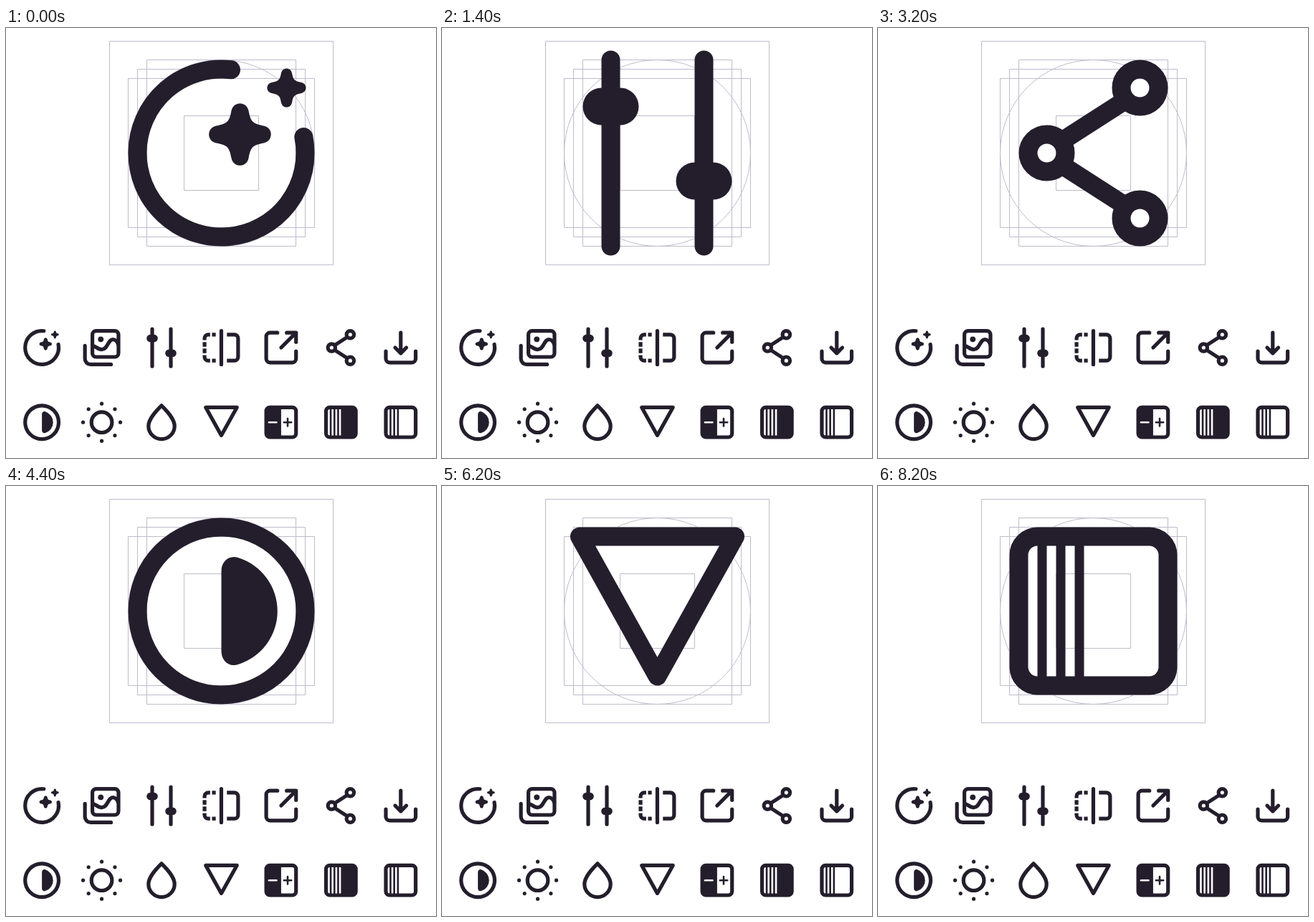
Recreate the animation shown at these times as an HTML page. Size 600x600 px, loop 8.8 s.

```html
<!DOCTYPE html>
<html lang="en">
<head>
<meta charset="utf-8">
<title>Icon set</title>
<style>
  html, body { margin: 0; width: 100%; height: 100%; overflow: hidden; background: #fff; }
  svg { display: block; width: 100vw; height: 100vh; }
  .guides { fill: none; stroke: #bfbbcd; }
  .guides * { vector-effect: non-scaling-stroke; stroke-width: 1px; }
  .icon { fill: none; stroke: #241e2c; stroke-width: 2; stroke-linecap: round; stroke-linejoin: round; }
  .solid { fill: #241e2c; stroke: none; }
  .butt { stroke-linecap: butt; }
  .thin { stroke-width: 1; }
</style>
</head>
<body>
<svg viewBox="0 0 600 600">
  <defs>
    <path id="star" class="solid" d="M-.92-2.55C-.7-3.59 .7-3.59 .92-2.55C1.15-1.35 1.35-1.15 2.55-.92C3.59-.7 3.59 .7 2.55 .92C1.35 1.15 1.15 1.35 .92 2.55C.7 3.59-.7 3.59-.92 2.55C-1.15 1.35-1.35 1.15-2.55 .92C-3.59 .7-3.59-.7-2.55-.92C-1.35-1.15-1.15-1.35-.92-2.55Z"/>
    <rect id="frame" x="4" y="4" width="16" height="16" rx="2"/>

    <g id="magic">
      <path d="M20.83 10.27A9 9 0 1 1 13.04 3.06"/>
      <use href="#star" transform="translate(14 10)"/>
      <use href="#star" transform="translate(19 5) scale(.625)"/>
    </g>
    <g id="gallery">
      <rect x="7" y="3" width="14" height="14" rx="2"/>
      <circle class="solid" cx="11.5" cy="7.5" r="1.5"/>
      <path class="butt" d="M7 11C8.7 11 9.8 13 12 13C15.3 13 15.3 7.6 18 7.6C19.3 7.6 20.5 9 21 10.6"/>
      <path d="M3 11V18A3 3 0 0 0 6 21H17"/>
    </g>
    <g id="sliders">
      <path d="M7 2V22M17 2V22"/>
      <rect class="solid" x="4" y="5" width="6" height="4" rx="2"/>
      <rect class="solid" x="14" y="13" width="6" height="4" rx="2"/>
    </g>
    <g id="mirror">
      <path d="M12 3V21"/>
      <path class="butt" d="M15 5H19A2 2 0 0 1 21 7V17A2 2 0 0 1 19 19H15M6 5H5A2 2 0 0 0 3 7V8M3 9V11.5M3 12.5V15M3 16V17A2 2 0 0 0 5 19H6M7 5H9M7 19H9"/>
    </g>
    <g id="export">
      <path d="M10 4H6A2 2 0 0 0 4 6V18A2 2 0 0 0 6 20H18A2 2 0 0 0 20 18V14M15 4H20V9M20 4L12 12"/>
    </g>
    <g id="share">
      <circle cx="17" cy="5" r="2"/>
      <circle cx="7" cy="12" r="2"/>
      <circle cx="17" cy="19" r="2"/>
      <path class="butt" d="M8.5 10.8L15.5 6.3M8.5 13.2L15.5 17.7"/>
    </g>
    <g id="download">
      <path d="M4 14V18A2 2 0 0 0 6 20H18A2 2 0 0 0 20 18V14M12 4V15M9 12L12 15L15 12"/>
    </g>
    <g id="contrast">
      <circle cx="12" cy="12" r="9"/>
      <path class="solid" d="M12 7.7C12 6.7 12.8 5.95 13.8 6.27A6 6 0 0 1 13.8 17.73C12.8 18.05 12 17.3 12 16.3Z"/>
    </g>
    <g id="sun">
      <circle cx="12" cy="12" r="5.5"/>
      <path d="M12 2h0M12 22h0M2 12h0M22 12h0M4.93 4.93h0M19.07 4.93h0M4.93 19.07h0M19.07 19.07h0"/>
    </g>
    <g id="drop">
      <path d="M12 3C9 6 5 10.2 5 14A7 7 0 0 0 19 14C19 10.2 15 6 12 3Z"/>
    </g>
    <g id="triangle">
      <path d="M3.65 4H20.35L12 19Z"/>
    </g>
    <g id="exposure">
      <use href="#frame"/>
      <path class="solid" d="M4 4H12V20H4Z"/>
      <path class="thin" stroke="#fff" style="stroke:#fff" d="M5.5 12H9.5"/>
      <path class="thin" d="M13.5 12H17.5M15.5 10V14"/>
    </g>
    <g id="stripes">
      <use href="#frame"/>
      <path class="thin butt" d="M6.5 4V20M8.5 4V20M10.5 4V20"/>
    </g>
    <g id="shade">
      <use href="#stripes"/>
      <path class="solid" d="M12 4H20V20H12Z"/>
    </g>
  </defs>

  <g class="guides" transform="translate(144.5 18.5) scale(13)">
    <rect width="24" height="24"/>
    <rect x="2" y="4" width="20" height="16"/>
    <rect x="3" y="3" width="18" height="18"/>
    <rect x="4" y="2" width="16" height="20"/>
    <rect x="8" y="8" width="8" height="8"/>
    <circle cx="12" cy="12" r="10"/>
  </g>
  <use id="preview" class="icon" href="#magic" transform="translate(144.5 18.5) scale(13)"/>
  <g id="shelf" class="icon"></g>
</svg>
<script>
  const icons = ['magic', 'gallery', 'sliders', 'mirror', 'export', 'share', 'download',
    'contrast', 'sun', 'drop', 'triangle', 'exposure', 'shade', 'stripes'];
  const LOOP = 8800;
  const holdOf = name => name === 'magic' || name === 'shade' ? 800 : 600;
  const preview = document.getElementById('preview');

  document.getElementById('shelf').innerHTML = icons.map((name, i) => {
    const x = 50.1 + (i % 7) * 83.45 - 31.2;
    const y = (i < 7 ? 446 : 550.2) - 31.2;
    return `<use href="#${name}" transform="translate(${x} ${y}) scale(2.6)"/>`;
  }).join('');

  function iconAt(time) {
    let end = 0;
    return icons.find(name => time < (end += holdOf(name)));
  }

  let shown = 'magic';
  function draw() {
    const name = iconAt(performance.now() % LOOP);
    if (name !== shown) preview.setAttribute('href', '#' + (shown = name));
    requestAnimationFrame(draw);
  }
  draw();
</script>
</body>
</html>
```
